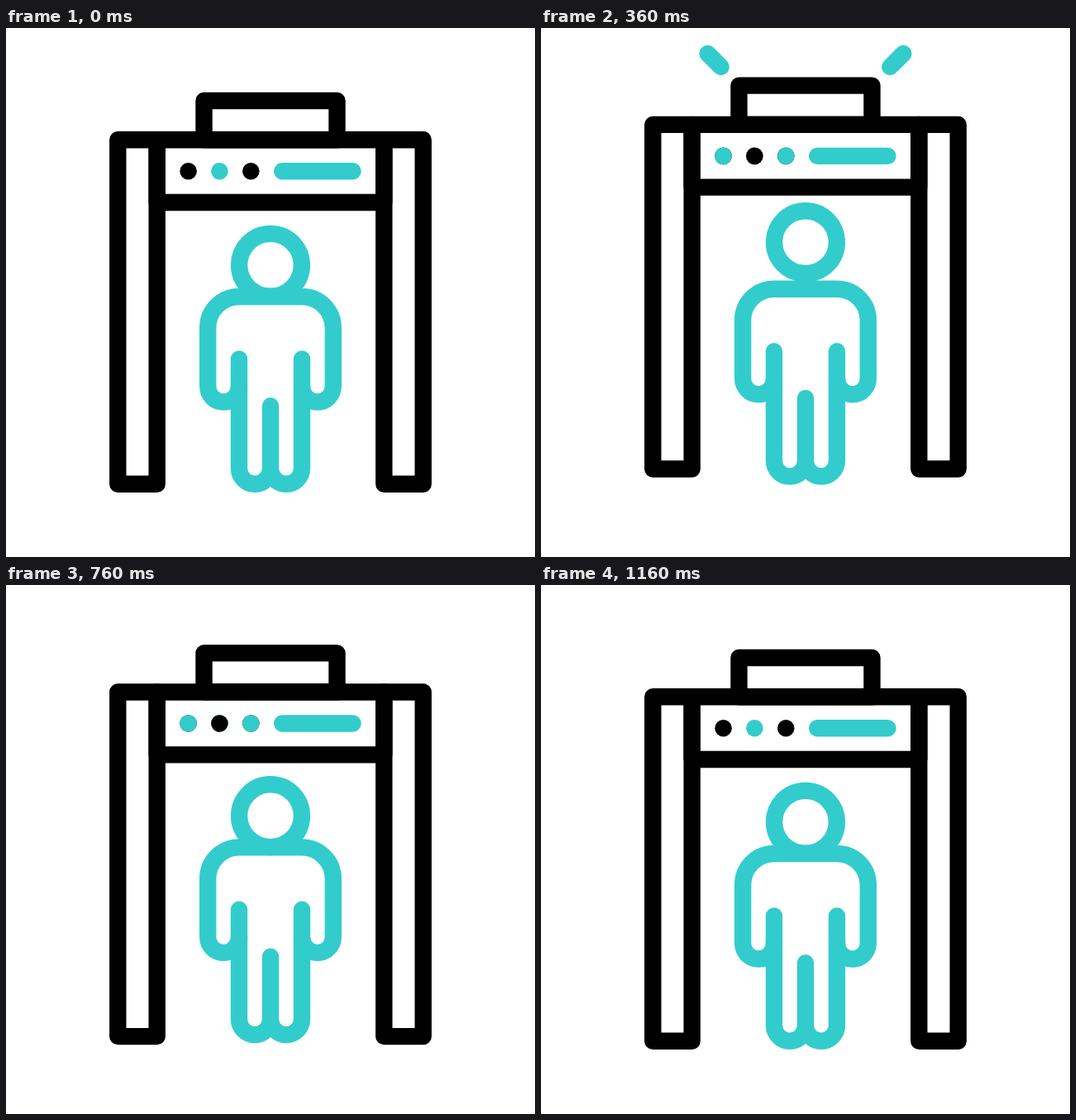
An HTML page for the animation above (1240 ms loop, 640 by 640 pixels).

```html
<!DOCTYPE html>
<html lang="en">
<head>
<meta charset="utf-8">
<title>Body scanner</title>
<style>
  html, body { margin: 0; width: 100%; height: 100%; overflow: hidden; background: #fff; }
  svg { display: block; width: 100vw; height: 100vh; }
  .line { fill: none; stroke-width: 20.4; stroke-linecap: round; stroke-linejoin: round; }
  .dark { stroke: #000; }
  .teal { stroke: #3cc; }
</style>
</head>
<body>
<svg viewBox="0 0 640 640">
  <g id="gate">
    <g class="line dark">
      <rect x="239.5" y="88" width="161" height="47.2"/>
      <rect x="135.3" y="135.2" width="47.4" height="416.6"/>
      <rect x="457.3" y="135.2" width="47.4" height="416.6"/>
      <rect x="182.7" y="135.2" width="274.6" height="75.8"/>
    </g>
    <g>
      <circle cx="220.6" cy="173.2" r="10.3"/>
      <circle cx="258.4" cy="173.2" r="10.3" fill="#3cc"/>
      <circle cx="296.3" cy="173.2" r="10.3"/>
    </g>
    <g id="lit">
      <circle cx="220.6" cy="173.2" r="10.3" fill="#3cc"/>
      <circle cx="258.4" cy="173.2" r="10.3"/>
      <circle cx="296.3" cy="173.2" r="10.3" fill="#3cc"/>
    </g>
    <path class="line teal" d="M334.2 173.2H419.5"/>
    <path id="rays" class="line teal"/>
  </g>
  <g class="line teal">
    <g id="body">
      <path d="M282 400.4V433.6a18.9 18.9 0 0 1-37.8 0V362.8A37.8 37.8 0 0 1 282 325H358A37.8 37.8 0 0 1 395.8 362.8V433.6a18.9 18.9 0 0 1-37.8 0V400.4"/>
      <path d="M282 433V532.8a19 19 0 0 0 38 0V457.2V532.8a19 19 0 0 0 38 0V433"/>
    </g>
    <circle id="head" cx="320" cy="286.8" r="37.9"/>
  </g>
</svg>
<script>
const LOOP = 1240, STEP = 40;
const smooth = u => u * u * (3 - 2 * u);
const rise = u => u * (2 - u);
const fall = u => u * u;

// Keys are [time, value, easing towards this key].
const gateKeys = [[100, 0], [395, -19.1, smooth], [675, 0, fall], [900, -9.2, rise], [1160, 0, fall]];
const bodyKeys = [[100, 0], [397, -9.7, smooth], [633, 0, fall], [785, -7.8, rise], [945, 0, fall]];
const headKeys = [[200, 0], [400, -20.5, smooth], [645, 0, fall]];
const rayTip = [[120, 220.3], [560, 187.5, smooth]];
const rayTail = [[290, 220.3], [700, 187.5, smooth]];

function valueAt(keys, t) {
  let [t0, v0] = keys[0];
  for (const [t1, v1, ease] of keys) {
    if (t <= t1) return t1 > t0 && t > t0 ? v0 + (v1 - v0) * ease((t - t0) / (t1 - t0)) : v0;
    t0 = t1;
    v0 = v1;
  }
  return v0;
}

const $ = id => document.getElementById(id);
const shift = (id, y) => $(id).setAttribute('transform', `translate(0 ${y})`);
const show = (id, on) => $(id).setAttribute('visibility', on ? 'visible' : 'hidden');

function draw(t) {
  const body = valueAt(bodyKeys, t);
  shift('gate', valueAt(gateKeys, t));
  shift('body', body);
  shift('head', body + valueAt(headKeys, t));

  const a = valueAt(rayTip, t), b = valueAt(rayTail, t), drop = 152.3;
  $('rays').setAttribute('d',
    `M${a} ${a - drop}L${b} ${b - drop}M${640 - a} ${a - drop}L${640 - b} ${b - drop}`);
  show('rays', t > 120 && t < 680);
  show('lit', t > 120 && t < 1040);
}

const start = performance.now();
function tick() {
  const t = (performance.now() - start) % LOOP;
  draw(Math.floor(t / STEP) * STEP);
  requestAnimationFrame(tick);
}
tick();
</script>
</body>
</html>
```
